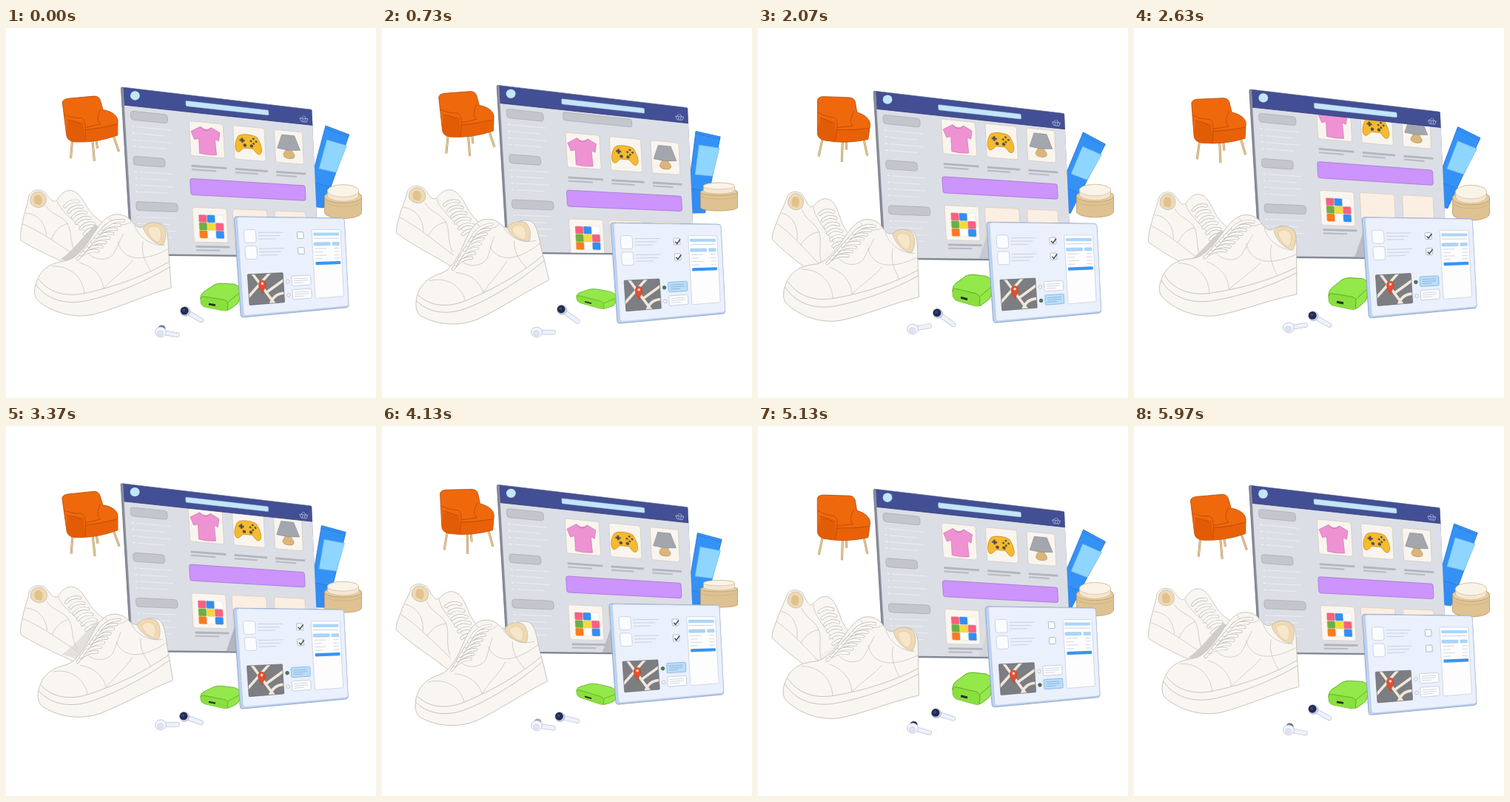
These frames come from a looping animation (500x500 px, 6010 ms). An HTML page with a canvas:

```html
<!DOCTYPE html>
<html lang="en">
<head>
<meta charset="utf-8">
<title>Floating shop</title>
<style>
html, body { margin: 0; width: 100%; height: 100%; overflow: hidden; background: #fff; }
canvas { display: block; width: 100vw; height: 100vh; }
</style>
</head>
<body>
<canvas id="stage"></canvas>
<script>
const LOOP = 6010;
const canvas = document.getElementById('stage');
const ctx = canvas.getContext('2d');
const dpr = window.devicePixelRatio || 1;
canvas.width = canvas.height = 500 * dpr;

// Cosine motion around mid, highest at time peak; fast runs twice per loop
const wave = period => (mid, amp, peak) => t => mid + amp * Math.cos(2 * Math.PI * (t - peak) / period);
const slow = wave(LOOP);
const fast = wave(LOOP / 2);
const still = v => () => v;
const clamp = v => Math.max(0, Math.min(1, v));

// Eased steps: [time, value] pairs
function steps(keys, t) {
  for (let i = 1; i < keys.length; i++) {
    const [t0, a] = keys[i - 1], [t1, b] = keys[i];
    if (t < t1) {
      const p = clamp((t - t0) / (t1 - t0));
      return a + (b - a) * p * p * (3 - 2 * p);
    }
  }
  return keys[keys.length - 1][1];
}

function shape(d, fill, line, width = 0.8) {
  const path = d instanceof Path2D ? d : new Path2D(d);
  if (fill) { ctx.fillStyle = fill; ctx.fill(path); }
  if (line) { ctx.strokeStyle = line; ctx.lineWidth = width; ctx.stroke(path); }
}

function oval(x, y, rx, ry, fill, line, width) {
  const p = new Path2D();
  p.ellipse(x, y, rx, ry, 0, 0, Math.PI * 2);
  shape(p, fill, line, width);
}

function bar(a, b, color, width) {
  ctx.beginPath();
  ctx.moveTo(...a);
  ctx.lineTo(...b);
  ctx.strokeStyle = color;
  ctx.lineWidth = width;
  ctx.stroke();
}

function inside(m, draw) {
  ctx.save();
  ctx.transform(m.a, m.b, m.c, m.d, m.e, m.f);
  draw();
  ctx.restore();
}

function faded(alpha, draw) {
  ctx.globalAlpha = clamp(alpha);
  draw();
  ctx.globalAlpha = 1;
}

const basis = ([p, q, r]) =>
  new DOMMatrix([q[0] - p[0], q[1] - p[1], r[0] - p[0], r[1] - p[1], p[0], p[1]]);

// A stiff drawing that drifts and turns around a pivot
const rigid = (x, y, dx, dy, turn, draw) => t =>
  inside(new DOMMatrix().translate(x + dx(t), y + dy(t)).rotate(turn(t)).translate(-x, -y), draw);

// A drawing bent by three points: [rest x, rest y, x motion, y motion]
function bent(points, draw) {
  const rest = basis(points).inverse();
  return t => {
    const now = basis(points.map(([, , x, y]) => [x(t), y(t)]));
    inside(now.multiply(rest), () => draw(t));
  };
}

const chair = rigid(151, 130, still(0), fast(-1, 6, 2250), fast(4.2, -4.4, 300), () => {
  const legs = 'M90 152L88 178M117 152L120 181M145 146L153 168M122 152L124 164';
  shape(legs, null, '#b08d5c', 3);
  shape(legs, null, '#e2c597', 2);
  shape('M76 103Q76 98 84 97L118 93.5Q125 93 127 99L131 112C140 113 150 118 151 126L151 146Q122 157 92 155.5Q83 154 82 147Z', '#f0680c', '#b54a05');
  shape('M83 127L104 129L108 154Q98 157 90 155Q83 153 82 146Z', '#e25c06');
  shape('M105 139Q124 136 151 131L151 146Q130 153 107 154Z', '#e86108');
  shape('M78 119C84 121 92 124 100 123C108 124 108 133 107 154M127 111C124 120 122 126 128 131L107 136M108 139Q130 137 150 131M82 126C90 127 97 128 101 132', null, '#b54a05');
});

const tube = rigid(432, 132, fast(0, 8, 2250), fast(7, 7, 1450), fast(1, 8, 2250), () => {
  shape('M432 132L464 143.5L438 222L431 243L412 241L415 200Z', '#3492f7', '#2873ca');
  shape('M412 207L440 215L431 243L412 241Z', '#318cf3');
  shape('M434 151L461 158.5L447 195L424 190Z', '#8ed6ff', '#6cb4ea', 0.6);
  shape('M431 135L463 146.5M412 207L440 215', null, '#2873ca', 0.6);
});

const jarTop = fast(217, 4.7, 2600), jarTilt = fast(6.5, 2.8, 2600);

function jar(t) {
  const x = 455.5, y = jarTop(t), ry = jarTilt(t), edge = '#b99a68';
  const drum = (rx, top, bottom, fill, line) => {
    const p = new Path2D();
    p.ellipse(x, top, rx, ry, 0, Math.PI, 0);
    p.ellipse(x, bottom, rx, ry, 0, 0, Math.PI);
    p.closePath();
    shape(p, fill, line);
  };
  drum(25, y + 8, y + 29, '#dfc292', edge);
  oval(x, y + 8, 25, ry, '#e8cfa2', edge);
  const seam = new Path2D();
  seam.ellipse(x, y + 13, 25, ry, 0, 0, Math.PI);
  shape(seam, null, '#c9aa76', 0.6);
  drum(21, y, y + 6, '#f3e7d3', '#cdb590');
  oval(x, y, 21, ry, '#faf3e8', '#cdb590', 0.6);
}

const pod = bent([
  [262, 365, still(262), fast(358.5, 6.5, 250)],
  [290, 347, still(290), fast(343, 10, 650)],
  [295, 382, still(295), fast(378, 4, 100)]
], () => {
  shape('M263 369Q262 362 267 358L281 349Q285 347 291 347L308 348Q316 350 317 356L315 369Q314 373 309 376L301 381Q297 383 291 381.5L268 377Q263 375 263 369Z', '#93e84a', '#5ba51f');
  shape('M263 367Q264 363 268 364L294 368Q300 369 300 374L299 382Q295 382.5 291 381.5L268 377Q263 375 263 367Z', '#89df3e');
  shape('M263 367Q264 363 268 364L294 368Q300 369 300 374L299 381M300 371L316 359', null, '#5ba51f');
  shape('M274 373.5L283 375', null, '#28331f', 2.6);
});

function bud(hx, hy, ex, ey, drawHead) {
  return t => {
    const a = hx(t), b = hy(t), c = ex(t), d = ey(t);
    const k = 1 - 3 / Math.hypot(c - a, d - b);
    const end = [a + (c - a) * k, b + (d - b) * k];
    ctx.lineCap = 'round';
    bar([a, b], end, '#b9c1d8', 6.6);
    bar([a, b], end, '#edf1fb', 5.2);
    ctx.lineCap = 'butt';
    drawHead(a, b, t);
  };
}

const darkBud = bud(slow(241.5, 1.5, 1300), slow(386.7, -6.3, 800), still(266.5), slow(399.5, 3.5, 2600), (x, y) => {
  oval(x + 0.5, y + 0.5, 6.6, 6.4, '#c9d0e4', '#a3abc4', 0.6);
  oval(x - 0.6, y - 0.4, 5.4, 5.4, '#222a50');
  oval(x - 1.6, y - 1.2, 2, 2, '#3d4775');
});

const lightBud = bud(still(209), slow(407.5, 3.7, 400), still(234.5), slow(408.5, 7.5, 5600), (x, y, t) => {
  faded(slow(0, 1, 5200)(t), () => oval(x + 1.5, y - 5, 5, 4.4, '#2b3359'));
  oval(x, y, 7.4, 6.8, '#f4f6fc', '#b4bcd2');
  oval(x - 0.5, y + 1.5, 4, 3.4, '#dfe5f3', '#b4bcd2', 0.5);
});

const CREAM = '#f9f6f1', SEAM = '#c3beb7', TAN = '#f0d9b3';

function laces(count, x, y, dx, dy, lx, ly) {
  ctx.lineCap = 'round';
  for (let i = 0; i < count; i++) {
    const d = `M${x + dx * i} ${y + dy * i}q${lx * 0.4} ${ly - 2} ${lx} ${ly}`;
    shape(d, null, '#b9b4ad', 4.2);
    shape(d, null, '#fdfbf8', 2.9);
  }
  ctx.lineCap = 'butt';
}

const shoeShadow = fast(0.1, 0.9, 2850);

const backShoe = bent([
  [19, 280, still(19), fast(277, -7, 1100)],
  [42, 220, fast(47.5, 6.5, 1600), fast(217.8, -4.6, 900)],
  [85, 219, fast(91, 6, 1450), fast(224, -7, 400)]
], t => {
  shape('M31 232C31 223 41 217 51 221C58 226 62 238 69 232C75 222 83 217 91 220C99 222 105 235 112 245C119 254 128 259 138 266L142 302L98 322L75 311C55 303 35 294 20 285C18 278 22 266 24 256Z', CREAM, SEAM);
  shape('M34 237C32 226 39 221 47 222C55 224 56 232 53 238C47 244 38 243 34 237Z', TAN, SEAM);
  shape('M40 238C36 230 40 225 45 226C50 228 50 235 47 239Z', '#e0c28f');
  shape('M23 264C45 272 68 288 94 304M27 250C40 250 52 258 54 278M54 240C62 252 76 252 82 262C88 272 84 284 92 300M69 233C72 244 88 256 104 270M60 283C66 270 74 264 82 262', null, SEAM, 0.7);
  laces(6, 79, 240, 5, 7, 18, -7);
  faded(shoeShadow(t), () => shape('M119 262L130 268L96 314L72 308C88 297 101 279 119 262Z', '#cfcdcb'));
});

const collarSlide = fast(-5, -5, 1100);

const frontShoe = bent([
  [39, 355, fast(40.5, 6.5, 850), fast(366, 16, 1100)],
  [223, 347, fast(221, 4, 550), fast(349.5, -11.5, 700)],
  [179, 259, fast(172.5, -8, 1100), fast(263.5, 5, 1750)]
], t => {
  shape('M40 346C45 329 57 318 78 315C92 313 99 304 107 295C118 282 127 262 140 255C148 250 160 251 168 258L175 266C180 270 184 270 188 267C195 261 208 261 215 267C222 277 219 294 222 322L223.5 350C190 359 152 377 118 386C90 392 60 383 42 367C37 361 38 352 40 346Z', CREAM, SEAM, 0.9);
  inside(new DOMMatrix().translate(collarSlide(t), 0), () => {
    shape('M188 270C192 262 207 260 215 267C220 274 219 285 215 292C207 293 194 285 188 270Z', TAN, SEAM);
    shape('M194 272C198 266 207 266 211 272C214 279 212 286 208 289C201 286 196 280 194 272Z', '#f6e6ca', '#dcc397', 0.6);
  });
  shape('M40 346C58 371 88 373 112 367C150 358 190 341 222 322M44 339C60 360 86 363 110 357C150 348 190 333 221 315', null, SEAM, 0.9);
  shape('M62 322C84 320 104 334 106 358M100 317C118 322 130 334 132 351M175 267C180 282 196 294 216 293M152 289C158 312 182 318 220 298M186 288C182 306 192 320 196 328M107 296C112 312 134 318 146 305L160 277M132 351C146 336 160 328 172 313M140 256C146 264 156 270 170 262', null, SEAM, 0.7);
  laces(8, 97, 312, 5, -5.8, 28, -11);
});

// A slanted panel: flat coordinates to stage coordinates
function panel({ x, y, slope, skew, turn, shrink }) {
  const P = (u, v) => [x + u + v * (skew - u * turn), y + u * slope + v * (1 - u * shrink)];
  const path = (u, v, w, h, r = 0) => {
    const p = new Path2D(), U = u + w, V = v + h;
    p.moveTo(...P(u + r, v));
    p.lineTo(...P(U - r, v));
    p.quadraticCurveTo(...P(U, v), ...P(U, v + r));
    p.lineTo(...P(U, V - r));
    p.quadraticCurveTo(...P(U, V), ...P(U - r, V));
    p.lineTo(...P(u + r, V));
    p.quadraticCurveTo(...P(u, V), ...P(u, V - r));
    p.lineTo(...P(u, v + r));
    p.quadraticCurveTo(...P(u, v), ...P(u + r, v));
    p.closePath();
    return p;
  };
  return {
    P, path,
    box: (u, v, w, h, r, fill, line, width) => shape(path(u, v, w, h, r), fill, line, width),
    rule: (u, v, w, color, width = 1) => bar(P(u, v), P(u + w, v), color, width),
    art: (u, v, draw) => inside(basis([P(u, v), P(u + 1, v), P(u, v + 1)]), draw)
  };
}

function shirt() {
  shape('M15 5Q22 12 30 5L41 11L39 23L34 21L35 43Q24 45 12 43L12 22L6 24L2 13Z', '#ef92d3', '#c76cab', 0.6);
  shape('M15 5Q22 15 30 5', null, '#c76cab', 0.7);
}

function gamepad() {
  shape('M7 13C11 9 27 9 32 13C37 21 40 33 35 37C30 39 28 31 25 30L14 30C11 31 8 38 4 36C0 33 2 19 7 13Z', '#f6ba2f', '#b8851a', 0.7);
  shape('M8 19H15M11.5 15.5V22.5', null, '#55504a', 2.6);
  for (let i = 0; i < 4; i++) {
    const a = i * Math.PI / 2;
    oval(27 + 3.5 * Math.cos(a), 19 + 3.5 * Math.sin(a), 1.5, 1.5, '#55504a');
  }
  oval(15, 26, 2.3, 2.3, '#55504a');
  oval(24, 26, 2.3, 2.3, '#55504a');
}

function lamp() {
  shape('M16 25H21L26 34Q27 40 18.5 40Q10 40 11 34Z', '#dbb57a', '#ab8850', 0.6);
  shape('M10 5H27L34 26Q18 29 3 26Z', '#a4a6ad', '#85878f', 0.6);
}

const SCROLL = [[0, 0], [200, 0], [950, 24], [1600, 24], [2400, -27], [2950, -27], [3850, 0]];
const CUBE = ['#fb5f7f', '#2f8ff5', '#ffffff', '#6bb13f', '#f6d93a', '#fb5f7f', '#ff7a1c', '#ffffff', '#2f8ff5'];
const boardTop = fast(81, -4, 600), boardShadow = slow(0.3, 0.5, 3400);

function board(t) {
  const top = boardTop(t), s = steps(SCROLL, t);
  const b = panel({ x: 157.5 + (top - 81) * 0.12, y: top + 0.3, slope: 0.1185, skew: 0.06, turn: 0.00008, shrink: 0.00048 });
  b.box(-2, 0, 257.5, 227, 2, '#8a8e9b', '#666b7c');
  const face = b.path(1, 0, 255, 225, 1);
  shape(face, '#dcdee5');
  ctx.save();
  ctx.clip(face);

  [50, 43, 57].forEach((w, k) => {
    const v = 31 + k * 61.5;
    b.box(9, v, w, 12, 4, '#c4c6cc', '#a5a8b0', 0.7);
    for (let i = 0; i < 4; i++) {
      b.rule(10, v + 21 + i * 9, 3, '#f4f5f8', 1.2);
      b.rule(16, v + 21 + i * 9, i % 2 ? 38 : 46, '#eceef3');
    }
  });

  const caption = (u, v, w) => {
    b.rule(u, v, w, '#b2b5bc', 2.8);
    b.rule(u, v + 5, w * 0.7, '#b9bcc3', 2.2);
  };
  b.box(86, 8 + s, 93, 11.5, 2.5, '#c4c6cc', '#a5a8b0', 0.7);
  [[88, 46, shirt], [147.5, 42.5, gamepad], [203.5, 38, lamp]].forEach(([u, w, art]) => {
    b.box(u, 36.5 + s, w, 49, 3, '#f9f5ee', '#cfc8bd', 0.7);
    b.art(u, 38 + s, art);
    caption(u, 100 + s, w + 2);
  });

  b.box(85, 118 + s, 157, 23, 3, '#cc94fc', '#a673d6');
  [[86, 46.5], [141, 47], [199, 42]].forEach(([u, w], i) => {
    b.box(u, 158.5 + s, w, 49, 3, i ? '#fbeee2' : '#faf6ef', '#d8cbbb', 0.7);
    caption(u + 2, 214 + s, w);
  });
  CUBE.forEach((c, i) =>
    b.box(94 + i % 3 * 11.3, 168.5 + s + Math.floor(i / 3) * 11.2, 11.1, 11, 1.5, c, '#d6d0c8', 0.4));

  faded(boardShadow(t), () => b.art(148, 175, () => shape('M0 0L-22 60H20V0Z', '#a9abb3')));

  b.box(0, -1, 258, 25, 0, '#434f94');
  b.rule(0, 24, 258, '#343d78', 0.8);
  b.box(85, 8.5, 112, 7.5, 1.5, '#c5e5fa', '#93b9da', 0.5);
  oval(...b.P(16.5, 9.5), 6.4, 6.2, '#c2e6fa');
  b.art(239, 11, () => shape('M0 4H11L9 9H2ZM2 4L5 0M9 4L6 0M4 5V8M7 5V8', null, '#b9c6e6'));
  ctx.restore();
}

const tabletTop = slow(252.8, 13, 1350);

function tablet(t) {
  const top = tabletTop(t);
  const p = panel({ x: 311 + (top - 254) * 0.09, y: top + 0.5, slope: 0.0138, skew: 0.068, turn: 0.00016, shrink: 0.00078 });
  p.box(-3, -0.5, 149, 136, 4, '#bcd3f1', '#8ba0c2', 0.9);
  p.box(1, 0, 145, 133.5, 3.5, '#eaf0fc', '#b5c6e2', 0.7);

  for (let i = 0; i < 2; i++) {
    const v = 17 + i * 22.5, since = t - i * 200;
    p.box(9, v, 16, 18, 3, '#fbfcfe', '#c6cbd6');
    [34, 30, 24].forEach((w, k) => p.rule(28, v + 4 + k * 4.5, w, '#c6cdd9', 0.9));
    p.box(81, v + 3.5, 8.5, 9.5, 1, '#fcfdff', '#a3a9b6');
    if (since > 250 && since < 4650) p.art(81, v + 3.5, () => shape('M2 5L4.3 8L9 1.5', null, '#40454f', 1.5));
  }

  const area = p.path(10, 78, 48.5, 42, 1);
  shape(area, '#7d7e82');
  ctx.save();
  ctx.clip(area);
  p.art(10, 78, () => {
    shape('M-2 32L32 -2M6 -2L36 44M52 8L24 26M28 44C32 30 42 27 52 28', null, '#f0e7da', 3.6);
    shape('M19 27C16 20 13 17 15 12C17 8 23 8 24 13C25 18 21 21 19 27Z', '#e4502f', '#b63a25', 0.5);
    oval(19.5, 13.5, 1.8, 1.8, '#fbd9cf');
  });
  ctx.restore();
  shape(area, null, '#5f6066', 0.6);

  const pick = t < 650 || t > 5500 ? -1 : t < 1200 ? 0 : t < 2100 ? 1 : t < 4600 ? 0 : 1;
  for (let i = 0; i < 2; i++) {
    const v = 83.5 + i * 19.5, on = pick === i;
    p.box(70, v, 26, 14, 1.5, on ? '#b9defb' : '#fcfdff', on ? '#7fb0dc' : '#bfc6d4');
    for (let k = 0; k < 3; k++) p.rule(73, v + 4 + k * 3, k === 2 ? 13 : 19, on ? '#86add0' : '#c5cbd8', 0.8);
    oval(...p.P(64.5, v + 7.3), 2.3, 2.3, on ? '#55765f' : '#fcfdff', on ? '#3f5c4a' : '#aab2c2');
  }

  p.box(101, 17, 39, 101, 1.5, '#fdfdfe', '#c9d0de');
  p.box(103, 21.5, 35, 4.5, 0.8, '#a9d6fb');
  p.rule(103, 30, 34, '#c2c9d6', 0.8);
  p.box(103, 36, 22, 4.5, 0.8, '#a9d6fb', '#85b6e0', 0.4);
  p.box(128, 36, 9.5, 4.5, 0.8, '#a9d6fb', '#85b6e0', 0.4);
  for (let i = 0; i < 4; i++) {
    p.rule(104, 45 + i * 5, i % 2 ? 10 : 16, '#c8cdd7', 0.8);
    p.rule(130, 45 + i * 5, 7, '#c8cdd7', 0.8);
  }
  p.box(104, 64.5, 34, 4.6, 1, '#3595f6');
}

const scene = [tube, jar, board, backShoe, frontShoe, pod, tablet, chair, darkBud, lightBud];

function draw(t) {
  ctx.setTransform(dpr, 0, 0, dpr, 0, 0);
  ctx.fillStyle = '#fff';
  ctx.fillRect(0, 0, 500, 500);
  ctx.lineJoin = 'round';
  scene.forEach(part => part(t));
}

const start = performance.now();
function tick() {
  draw((performance.now() - start) % LOOP);
  requestAnimationFrame(tick);
}
tick();
</script>
</body>
</html>
```
